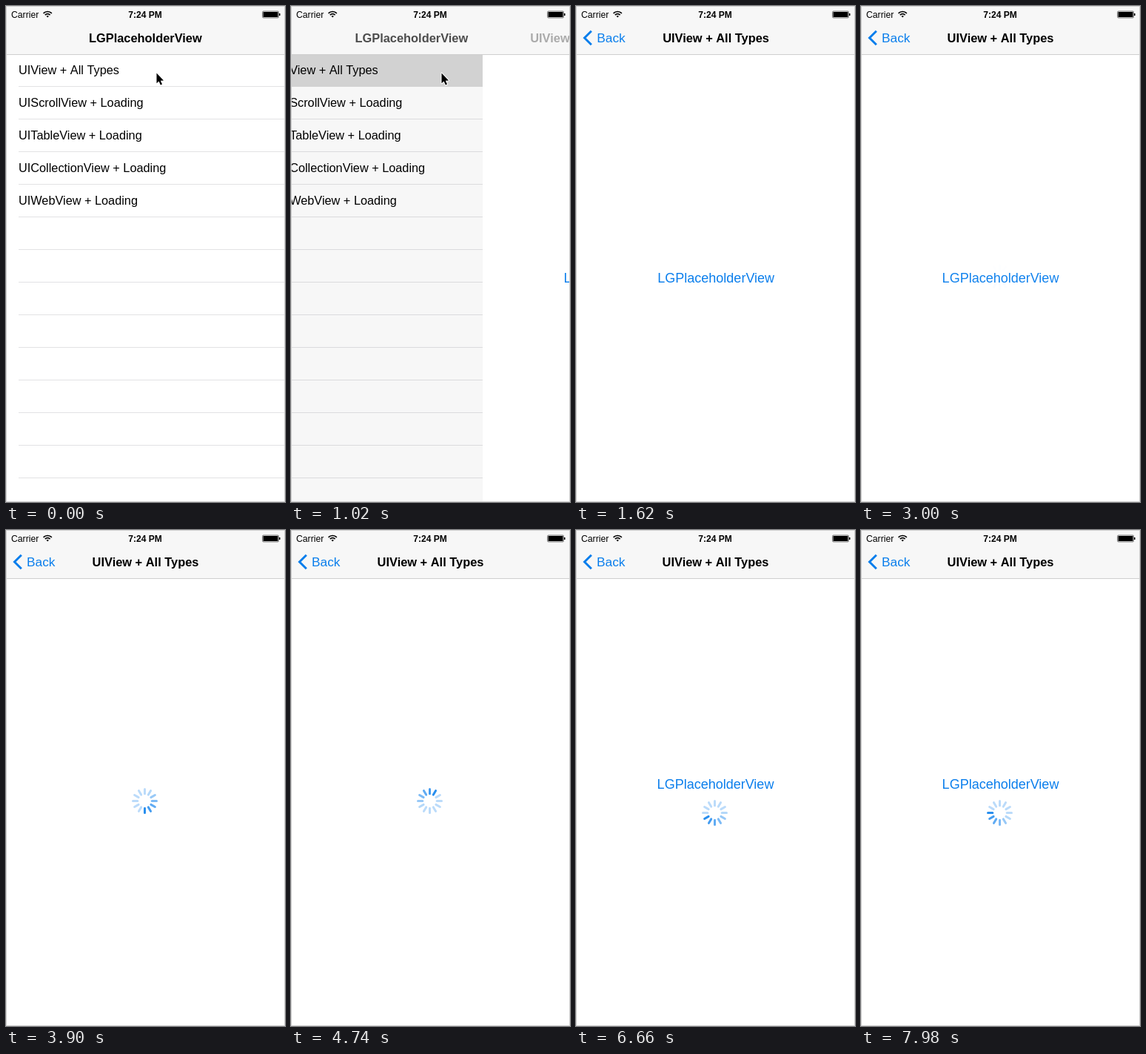
Animation, 377 px wide and 669 px high, one loop 8 s. Source, as an HTML page with a canvas:

```html
<!DOCTYPE html>
<html lang="en">
<head>
<meta charset="utf-8">
<title>LGPlaceholderView</title>
<style>
html, body { margin: 0; width: 377px; height: 669px; overflow: hidden; background: #fff; }
canvas { display: block; width: 377px; height: 669px; }
</style>
</head>
<body>
<canvas></canvas>
<script>
const W = 377, H = 669, LOOP = 8000, BLUE = '#0a7eec';
const FONT = 'px "Liberation Sans", Arial, sans-serif';
const NAME = 'LGPlaceholderView', FIRST = 'UIView + All Types';
const ROWS = [FIRST, 'UIScrollView + Loading', 'UITableView + Loading',
  'UICollectionView + Loading', 'UIWebView + Loading'];

const canvas = document.querySelector('canvas');
const scale = window.devicePixelRatio || 1;
canvas.width = W * scale;
canvas.height = H * scale;
const c = canvas.getContext('2d');

const clamp = v => Math.min(1, Math.max(0, v));
const mix = (a, b, p) => a + (b - a) * p;
const fade = (t, start) => (1 - Math.cos(Math.PI * clamp((t - start) / 840))) / 2;

function box(x, y, w, h, color) {
  c.fillStyle = color;
  c.fillRect(x, y, w, h);
}

function text(str, x, y, size, { color = '#000', bold = false, align = 'left', alpha = 1 } = {}) {
  if (alpha <= 0) return;
  c.globalAlpha = alpha;
  c.font = (bold ? 'bold ' : '') + size + FONT;
  c.textAlign = align;
  c.fillStyle = color;
  c.fillText(str, x, y);
  c.globalAlpha = 1;
}

function line(points, color, width) {
  c.beginPath();
  points.forEach(([x, y]) => c.lineTo(x, y));
  c.strokeStyle = color;
  c.lineWidth = width;
  c.stroke();
}

function list(selected) {
  box(0, 65, W, H - 65, '#fff');
  for (let i = 0; i < 13; i++) box(17, 108 + 44 * i, W - 17, 1, '#e2e2e4');
  if (selected) box(0, 65, W, 44, '#d9d9d9');
  ROWS.forEach((row, i) => text(row, 17, 92 + 44 * i, 16.3));
}

function spinner(y, phase, alpha) {
  if (alpha <= 0) return;
  const head = Math.floor(phase);
  c.lineCap = 'round';
  for (let i = 0; i < 12; i++) {
    const age = (((head - i) % 12) + 12) % 12;
    const a = i * Math.PI / 6, dx = Math.sin(a), dy = -Math.cos(a);
    c.globalAlpha = alpha * Math.max(0.28, 0.88 - 0.115 * age);
    line([[187.5 + 9.7 * dx, y + 9.7 * dy], [187.5 + 16 * dx, y + 16 * dy]], BLUE, 3);
  }
  c.globalAlpha = 1;
  c.lineCap = 'butt';
}

function detail(t) {
  const loading = fade(t, 2910), labelled = fade(t, 5430);
  const phase = 6.02 + (t - 3900) / 105.5;
  const label = (y, alpha) => text(NAME, 188.5, y, 18, { color: BLUE, align: 'center', alpha });
  box(0, 65, W, H - 65, '#fff');
  label(373, 1 - loading);
  spinner(365.5, phase, loading * (1 - labelled));
  label(349, labelled);
  spinner(381.5, phase + 0.4, labelled);
}

function statusBar() {
  text('Carrier', 7, 15.5, 12.2);
  text('7:24 PM', 188, 15.5, 12, { bold: true, align: 'center' });
  for (const r of [1.2, 4.8, 8]) {
    c.beginPath();
    c.arc(56.2, 15.5, r, -Math.PI * 0.75, -Math.PI * 0.25);
    c.strokeStyle = '#000';
    c.lineWidth = r < 2 ? 2.4 : 1.7;
    c.stroke();
  }
  c.beginPath();
  c.roundRect(346.5, 7, 22, 9, 1.5);
  c.strokeStyle = '#555';
  c.lineWidth = 0.8;
  c.stroke();
  box(347.5, 8, 20, 7, '#000');
  box(369, 10, 1.5, 3, '#000');
}

function navBar(p) {
  box(0, 0, W, 65, '#f7f7f7');
  box(0, 65, W, 1, '#cfcfcf');
  const back = clamp((p - 0.81) / 0.19);
  text(NAME, mix(112, 30, p), 49, 16.4, { bold: true, alpha: 1 - p });
  text(FIRST, 188.5 + 300 * (1 - p), 49, 16.4, { bold: true, align: 'center', alpha: p });
  text('Back', mix(168, 28, p), 49, 17.3, { color: BLUE, alpha: back });
  c.globalAlpha = back;
  line([[20.8, 33.8], [11.5, 43], [20.8, 52.2]], BLUE, 3);
  c.globalAlpha = 1;
}

function cursor() {
  c.beginPath();
  [[203.5, 90.5], [203.5, 104.3], [206.6, 101.5], [208.8, 106.6], [211, 105.6],
    [208.8, 100.7], [213, 100.4]].forEach(([x, y]) => c.lineTo(x, y));
  c.closePath();
  c.lineJoin = 'round';
  c.strokeStyle = '#fff';
  c.lineWidth = 2;
  c.stroke();
  c.lineJoin = 'miter';
  c.fillStyle = '#000';
  c.fill();
}

// Critically damped slide of the pushed screen.
function pushProgress(t) {
  if (t >= 1750) return 1;
  const k = 12.4 * Math.max(0, t - 930) / 1000;
  return 1 - (1 + k) * Math.exp(-k);
}

function draw(t) {
  const p = pushProgress(t), x = (W - 1) * (1 - p);
  c.setTransform(scale, 0, 0, scale, 0, 0);
  if (p < 1) {
    c.save();
    c.translate(-0.3 * (W - 1) * p, 0);
    list(t >= 720);
    c.restore();
    box(0, 65, W, H - 65, `rgba(0,0,0,${0.1 * p})`);
  }
  if (p > 0) {
    c.save();
    c.translate(x, 0);
    detail(t);
    c.restore();
  }
  navBar(p);
  statusBar();
  if (t < 1440) cursor();
  c.strokeStyle = '#d2d2d2';
  c.lineWidth = 1;
  c.strokeRect(0.5, 0.5, W - 1, H - 1);
}

const start = performance.now();
function tick() {
  draw((performance.now() - start) % LOOP);
  requestAnimationFrame(tick);
}
tick();
</script>
</body>
</html>
```
